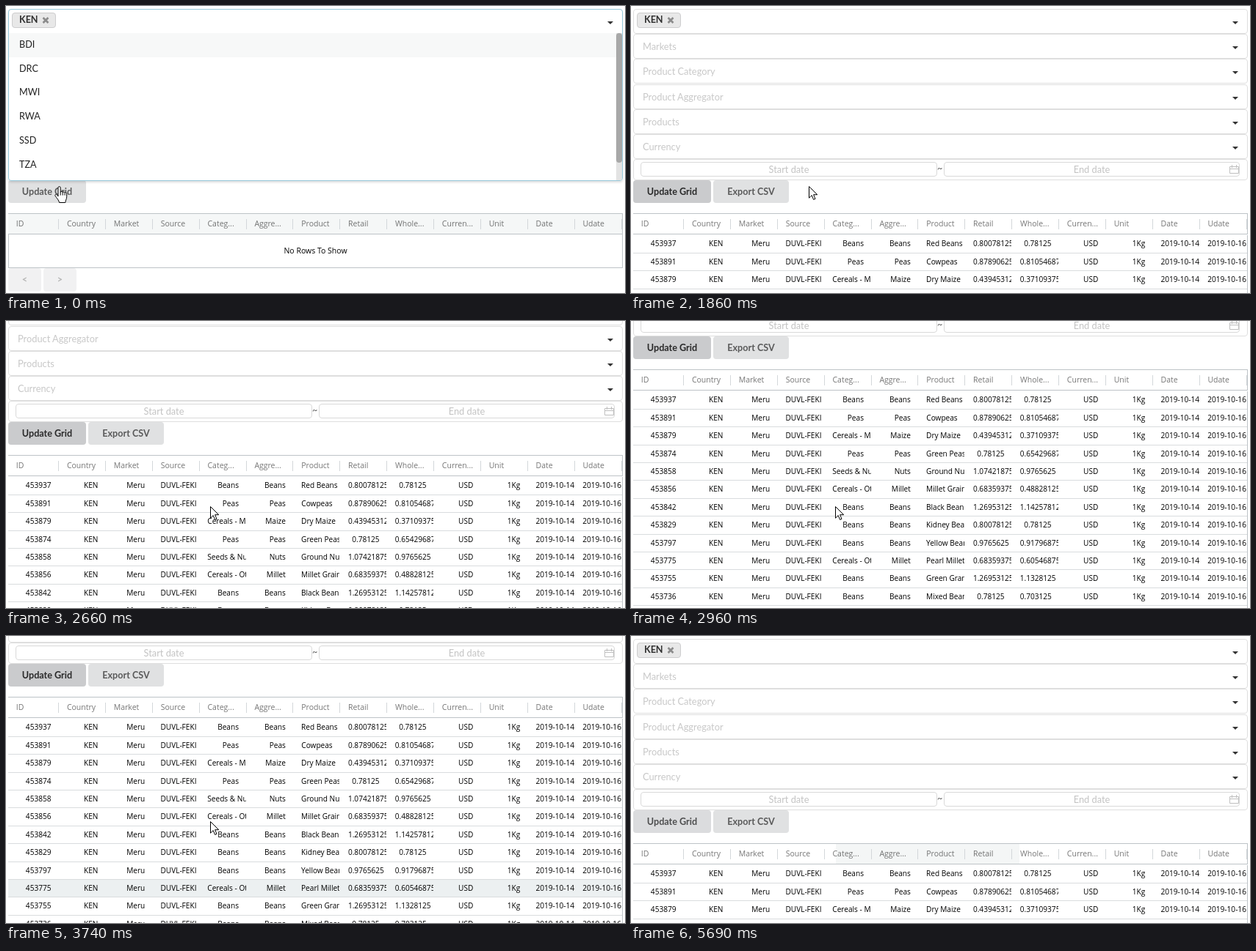
An HTML page for the animation above (5790 ms loop, 843x392 px).

```html
<!DOCTYPE html>
<html lang="en">
<head>
<meta charset="utf-8">
<title>Price grid</title>
<style>
  html, body { margin: 0; width: 100%; height: 100%; overflow: hidden; background: #fff; }
  body { position: relative; font: 12.6px Lato, sans-serif; color: rgba(0, 0, 0, .87); }
  * { box-sizing: border-box; }
  #page, #page div, svg { position: absolute; white-space: nowrap; }
  #page { left: 0; top: 0; width: 843px; height: 720px; }

  #page .field { left: 3px; width: 837px; height: 34px; padding-left: 12px; border: 1px solid #dedede;
    border-radius: 4px; font-size: 12.8px; line-height: 32px; color: #c8c8c8; }
  .field::after { content: ""; position: absolute; right: 12px; top: 16px; border: 4px solid transparent;
    border-top-color: #333; border-bottom: 0; }
  #page .dates { top: 209px; height: 29px; }
  .dates::after { display: none; }
  #page .date { top: 213px; height: 20px; border: 1px solid #d9d9d9; border-radius: 4px;
    font-size: 12.8px; line-height: 18px; text-align: center; color: #c3c3c3; }
  #page .tag { left: 8px; top: 9px; width: 60px; height: 21px; padding-left: 9px; border: 1px solid #cdcdce;
    border-radius: 4px; background: #e8e8e8; font-weight: 700; line-height: 18px; color: rgba(0, 0, 0, .8); }

  #page .menu { left: 3px; top: 4px; width: 837px; height: 235px; overflow: hidden; background: #fff;
    border: 1px solid #96c8da; border-radius: 4px; }
  #page .shadow { left: 3px; top: 4px; width: 837px; height: 235px; border-radius: 4px;
    box-shadow: 0 2px 3px rgba(34, 36, 38, .15); }
  #page .item { left: 0; width: 827px; height: 32.7px; padding-left: 14px; line-height: 32px; }
  #page .item:first-child { background: #f7f8f8; }
  #page .track { left: 827px; top: 32px; width: 8px; height: 202px; background: #e3e3e3; }
  #page .thumb { width: 8px; height: 177px; border-radius: 4px; background: #a8a8a8; }

  #page .button { top: 238px; height: 31px; border-radius: 4px; background: #e0e1e2; font-weight: 700;
    line-height: 31px; text-align: center; color: rgba(0, 0, 0, .6); }
  #page .pager { top: 358px; width: 45px; height: 32px; line-height: 32px; opacity: .45; }

  #grid, #page .empty { font: 10.5px "Open Sans", "Noto Sans", sans-serif; color: #000; }
  #page .head { left: 3px; top: 283px; width: 837px; height: 29px; border: 1px solid #bdc3c7;
    border-left: 0; background: #f5f7f7; }
  #page .title { top: 284px; height: 27px; padding-left: 10.8px; line-height: 27px; color: rgba(0, 0, 0, .54); }
  .title::after { content: ""; position: absolute; right: 0; top: 7px; width: 1px; height: 14px; background: #d3d7da; }
  #page .empty { left: 3px; top: 311px; width: 837px; height: 47px; border: 1px solid #bdc3c7;
    line-height: 45px; text-align: center; }
  #page .rows { left: 3px; top: 313.4px; width: 837px; border-right: 1px solid #bdc3c7; }
  #page .row { left: 0; width: 836px; height: 24.4px; border-bottom: 1px solid #d9dcde; }
  #page .cell { height: 23px; padding: 0 9.6px; border: solid transparent; border-width: 0 1px; overflow: hidden;
    font-size: 10.1px; line-height: 23px; text-align: right; }
  #page .patch { left: 279px; top: 284px; width: 250px; height: 27px; background: #f4f6f6; }
  svg { left: 0; top: 0; overflow: visible; fill: none; }
  .pointer { fill: #fff; stroke: #000; stroke-linejoin: round; }
</style>
</head>
<body>
<div id="page">
  <div id="form"></div>
  <div class="tag">KEN</div>
  <div class="field dates"></div>
  <div class="date" style="left:13px;width:404px">Start date</div>
  <div style="left:417px;top:214px;color:#666">~</div>
  <div class="date" style="left:426px;width:403px">End date</div>
  <svg width="1" height="1">
    <path d="M50.5 16l7 7m0-7l-7 7" stroke="#8b8b8b" stroke-width="2.6"/>
    <path d="M815.5 219.5h12v9h-12zM815.5 222.5h12M818.5 217v4M824.5 217v4" stroke="#bfbfbf"/>
  </svg>
  <div class="button" id="update" style="left:3px;width:106px">Update Grid</div>
  <div class="button" id="export" style="left:112px;width:103px">Export CSV</div>
  <div id="grid">
    <div class="head" id="head"></div>
    <div class="patch" id="patch"></div>
    <div id="titles"></div>
    <div class="rows" id="rows"></div>
  </div>
  <div id="blank">
    <div class="empty">No Rows To Show</div>
    <div class="button pager" style="left:3px">&lt;</div>
    <div class="button pager" style="left:51px">&gt;</div>
  </div>
  <div id="dropdown">
    <div class="shadow"></div>
    <div class="menu">
      <div id="items"></div>
      <div class="track"><div class="thumb"></div></div>
    </div>
    <div class="tag">KEN</div>
    <svg width="1" height="1">
      <path d="M50.5 16l7 7m0-7l-7 7" stroke="#8b8b8b" stroke-width="2.6"/>
      <path d="M819 21h8l-4 4z" fill="#333"/>
    </svg>
  </div>
</div>
<svg id="hand" class="pointer" width="18" height="24">
  <path d="M5 14V2.2a1.6 1.6 0 0 1 3.2 0V8.6a1.5 1.5 0 0 1 3 .3a1.5 1.5 0 0 1 2.9 .5a1.4 1.4 0 0 1 2.6 .8V14.5c0 3-1.6 4.5-1.9 8H6.6C6 19 3 16.5 1 13.2C.2 11.4 2.6 10.4 3.8 12.2Z"/>
  <path d="M8.2 8.6v4M11.2 9v3.6M14.1 9.6v3"/>
</svg>
<svg id="arrow" class="pointer" width="13" height="19">
  <path d="M.5 .5V16.2L4.2 12.6L6.6 18.4L9 17.4L6.6 11.7H11.7Z"/>
</svg>

<script>
const LOOP = 5790;
const $ = id => document.getElementById(id);

function add(parent, className, text = '', style = {}) {
  const el = document.createElement('div');
  el.className = className;
  el.textContent = text;
  Object.assign(el.style, style);
  parent.append(el);
  return el;
}

// Hold each style from its time until the next one.
function hold(el, steps) {
  const frames = steps.map(([ms, style]) => ({ ...style, offset: ms / LOOP, easing: 'step-end' }));
  frames.push({ ...steps.at(-1)[1], offset: 1 });
  el.animate(frames, { duration: LOOP, iterations: Infinity });
}

const show = on => ({ opacity: on ? 1 : 0 });
const at = (x, y, on = true) => ({ transform: `translate(${x}px, ${y}px)`, ...show(on) });

['', 'Markets', 'Product Category', 'Product Aggregator', 'Products', 'Currency']
  .forEach((label, i) => add($('form'), 'field', label, { top: 4 + 34.2 * i + 'px' }));
['BDI', 'DRC', 'MWI', 'RWA', 'SSD', 'TZA']
  .forEach((code, i) => add($('items'), 'item', code, { top: 32 + 32.7 * i + 'px' }));

const column = i => i
  ? { left: 72.1 + 63.87 * (i - 1), width: 63.87 }
  : { left: 3, width: 69.1 };

['ID', 'Country', 'Market', 'Source', 'Categ...', 'Aggre...', 'Product', 'Retail', 'Whole...',
  'Curren...', 'Unit', 'Date', 'Udate'].forEach((name, i) => {
  const { left, width } = column(i);
  add($('titles'), 'title', name, { left: left + 'px', width: width + 'px' });
});

// id, category, aggregate, product, then both prices in 1/1024 USD
const rows = [
  [453937, 'Beans', 'Beans', 'Red Beans', 820, 800],
  [453891, 'Peas', 'Peas', 'Cowpeas', 900, 830],
  [453879, 'Cereals - Maize', 'Maize', 'Dry Maize', 450, 380],
  [453874, 'Peas', 'Peas', 'Green Peas', 800, 670],
  [453858, 'Seeds & Nuts', 'Nuts', 'Ground Nuts', 1100, 1000],
  [453856, 'Cereals - Other', 'Millet', 'Millet Grain', 700, 500],
  [453842, 'Beans', 'Beans', 'Black Beans', 1300, 1170],
  [453829, 'Beans', 'Beans', 'Kidney Beans', 820, 800],
  [453797, 'Beans', 'Beans', 'Yellow Beans', 1000, 940],
  [453775, 'Cereals - Other', 'Millet', 'Pearl Millet', 700, 620],
  [453755, 'Beans', 'Beans', 'Green Gram', 1300, 1160],
  [453736, 'Beans', 'Beans', 'Mixed Beans', 800, 720],
  [453718, 'Cereals - Other', 'Sorghum', 'Red Sorghum', 700, 600],
  [453702, 'Cereals - Rice', 'Rice', 'Rice', 1200, 1100],
  [453689, 'Peas', 'Peas', 'Pigeon Peas', 900, 820],
  [453671, 'Cereals - Wheat', 'Wheat', 'Wheat', 600, 500],
].map(([id, category, aggregate, product, retail, wholesale], k) => {
  const row = add($('rows'), 'row', '', { top: 24.4 * k + 'px' });
  [id, 'KEN', 'Meru', 'DUVL-FEKI', category, aggregate, product, retail / 1024, wholesale / 1024,
    'USD', '1Kg', '2019-10-14', '2019-10-16'].forEach((value, i) => {
    const { left, width } = column(i);
    add(row, 'cell', value, { left: left - 3 + 'px', width: width + 'px' });
  });
  return row;
});
$('rows').style.height = 24.4 * rows.length + 'px';

const LOADED = 1860;
hold($('dropdown'), [[0, show(true)], [390, show(false)]]);
hold($('blank'), [[0, show(true)], [LOADED, show(false)]]);
for (const id of ['rows', 'export']) hold($(id), [[0, show(false)], [LOADED, show(true)]]);
hold($('head'), [[0, { backgroundColor: '#f5f7f7' }], [LOADED, { backgroundColor: '#fff' }]]);
hold($('patch'), [[0, show(false)], [4870, show(true)]]);

const shade = (backgroundColor, ink) => ({ backgroundColor, color: `rgba(0, 0, 0, ${ink})` });
hold($('update'), [[0, shade('#e0e1e2', .6)], [120, shade('#d2d3d5', .7)],
  [240, shade('#cacbcd', .8)], [5690, shade('#dbdcde', .65)]]);

const hover = on => ({ backgroundColor: on ? '#ecf0f1' : 'transparent' });
hold(rows[9], [[0, hover(false)], [3240, hover(true)], [4020, hover(false)]]);
hold(rows[2], [[0, hover(false)], [5170, hover(true)], [5290, hover(false)]]);

hold($('page'), [[0, 0], [2270, 3], [2400, 6], [2540, 45], [2660, 100], [2820, 160], [2960, 217],
  [3080, 260], [3240, 292], [3500, 275], [3620, 240], [3740, 200], [4020, 120], [4170, 45], [4290, 0]]
  .map(([ms, y]) => [ms, { transform: `translateY(${-y}px)` }]));

hold($('hand'), [[0, at(66, 246)], [120, at(60, 252)], [240, at(54, 257)], [1040, at(57, 255)],
  [1160, at(105, 247)], [1310, at(105, 247, false)]]);
hold($('arrow'), [[0, at(165, 247, false)], [1310, at(165, 247)], [1440, at(214, 247)], [1580, at(230, 246)],
  [1700, at(242, 246)], [2000, at(262, 250)], [2120, at(278, 253)], [4720, at(278, 253, false)],
  [4870, at(517, 321)], [5020, at(727, 365)], [5170, at(727, 365, false)]]);
</script>
</body>
</html>
```
